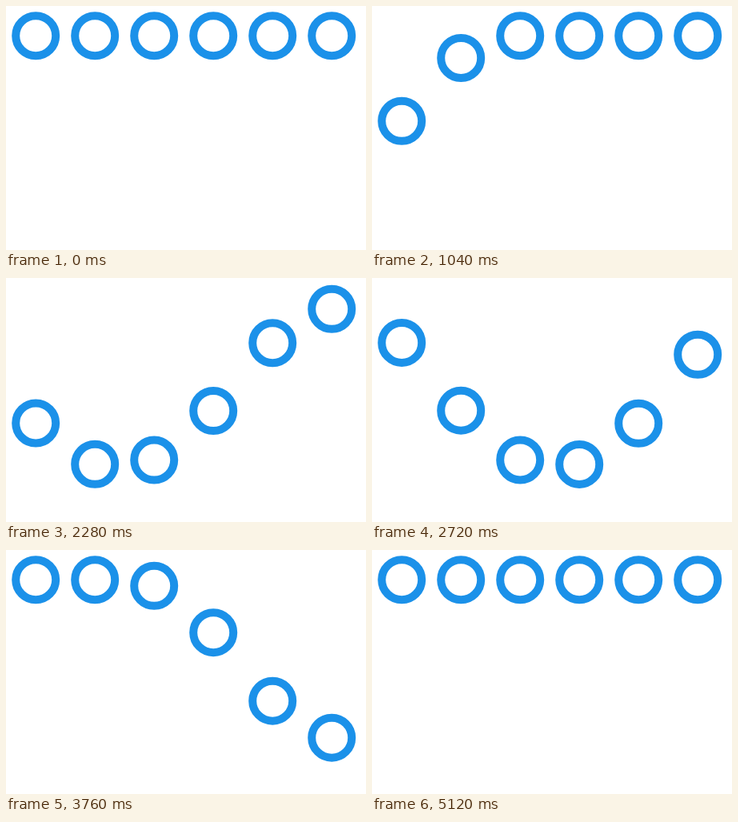
An HTML page for the animation above (5160 ms loop, 450x305 px).

```html
<!DOCTYPE html>
<html lang="en">
<head>
<meta charset="utf-8">
<title>Ring wave</title>
<style>
  html, body { margin: 0; width: 100%; height: 100%; overflow: hidden; background: #fff; }
  svg { display: block; }
  circle { fill: none; stroke: #1b91e9; stroke-width: 10; }
</style>
</head>
<body>
<svg id="stage" width="450" height="305" viewBox="0 0 450 305"></svg>
<script>
const LOOP = 5160, STEP = 40;
const START = 282, STAGGER = 380, FALL = 1460, DROP = 200;

const rings = Array.from({ length: 6 }, (_, i) => {
  const ring = document.createElementNS('http://www.w3.org/2000/svg', 'circle');
  ring.setAttribute('cx', 37.2 + 74 * i);
  ring.setAttribute('cy', 37.2);
  ring.setAttribute('r', 25);
  return document.getElementById('stage').appendChild(ring);
});

// cubic-bezier(.42, 0, .58, 1), solved by bisection
function easeInOut(x) {
  let lo = 0, hi = 1, s;
  for (let k = 0; k < 24; k++) {
    s = (lo + hi) / 2;
    const bx = 1.26 * (1 - s) ** 2 * s + 1.74 * (1 - s) * s * s + s ** 3;
    if (bx < x) lo = s; else hi = s;
  }
  return s * s * (3 - 2 * s);
}

// The middle of the wave runs at a slightly uneven pace
function pace(t) {
  const u = (t - 1040) / 2720;
  return u > 0 && u < 1 ? t - 14 * Math.sin(2 * Math.PI * u) : t;
}

function draw(t) {
  rings.forEach((ring, i) => {
    const phase = (pace(t) - START - i * STAGGER) / FALL;
    const height = Math.max(0, 1 - Math.abs(phase - 1));
    const y = height ? DROP * easeInOut(height) : 0;
    ring.setAttribute('transform', `translate(0 ${y})`);
  });
}

const begin = performance.now();
function frame() {
  const t = (performance.now() - begin) % LOOP;
  draw(Math.floor(t / STEP) * STEP);
  requestAnimationFrame(frame);
}
frame();
</script>
</body>
</html>
```
